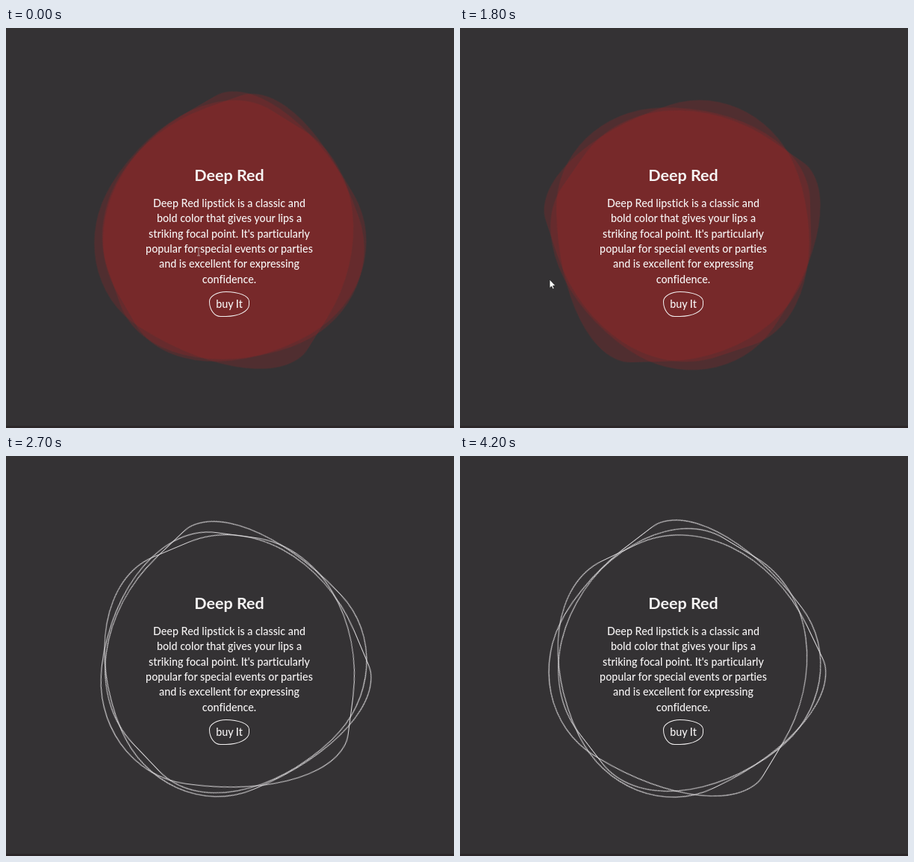
An HTML page for the animation above (4300 ms loop, 600x536 px).

```html
<!DOCTYPE html>
<html lang="en">
<head>
<meta charset="utf-8">
<title>Deep Red</title>
<style>
  html, body { margin: 0; width: 100%; height: 100%; overflow: hidden; }
  body { position: relative; background: #343234; }
  .blob {
    position: absolute;
    box-sizing: border-box;
    border: 1px solid #f4f2f2;
    border-radius: 42% 58% 58% 28% / 39% 38% 47% 59%;
  }
  .ring { left: 130px; top: 106px; width: 340px; height: 340px; }
  .button { left: 272px; top: 352.5px; width: 54px; height: 34.5px; }
  .edge { position: absolute; left: 0; top: 533px; width: 600px; height: 3px; background: #2c2729; }
  svg { position: absolute; left: 0; top: 0; }
  text {
    font: 500 14.3px Lato, sans-serif;
    font-variant-ligatures: none;
    fill: #f7f5f5;
    text-anchor: middle;
  }
  .title { font-size: 21.5px; font-weight: 700; }
</style>
</head>
<body>
<div class="edge"></div>
<div class="blob ring"></div>
<div class="blob ring"></div>
<div class="blob ring"></div>
<div class="blob button"></div>
<svg width="600" height="536">
  <g id="copy">
    <text class="title" x="299" y="205">Deep Red</text>
    <text x="299" y="375">buy It</text>
  </g>
  <g id="cursor">
    <path id="beam" d="M-2 -5.5H2M0 -5.5V5M-2 5H2" fill="none" stroke="#b59a9a"/>
    <path id="arrow" d="M0 0V11.5L2.6 9.2L4.4 13L6.2 12.2L4.5 8.5H8Z" fill="#fff" stroke="#222" stroke-width=".8"/>
  </g>
</svg>
<script>
const LOOP = 4300, STEP = 100, LEAVE = 1800, FADE = 500;
const $ = id => document.getElementById(id);

const lines = [
  "Deep Red lipstick is a classic and",
  "bold color that gives your lips a",
  "striking focal point. It's particularly",
  "popular for special events or parties",
  "and is excellent for expressing",
  "confidence."
];
lines.forEach((line, i) => {
  const el = document.createElementNS("http://www.w3.org/2000/svg", "text");
  el.setAttribute("x", 299);
  el.setAttribute("y", 240 + i * 20.3);
  el.textContent = line;
  $("copy").append(el);
});

const tracks = [];
const play = (el, frames) => {
  const track = el.animate(frames, { duration: LOOP, fill: "both" });
  track.pause();
  tracks.push(track);
};
const at = ms => ms / LOOP;

// start angle and degrees per second
const spins = [[-58, 72], [160.5, -90], [150, 36]];
const filled = "rgba(178,34,34,.22)", empty = "rgba(178,34,34,0)";

document.querySelectorAll(".ring").forEach((ring, i) => {
  const [start, speed] = spins[i];
  play(ring, { transform: [start, start + speed * LOOP / 1000].map(a => `rotate(${a}deg)`) });
  play(ring, [
    { backgroundColor: filled, offset: 0 },
    { backgroundColor: filled, offset: at(LEAVE), easing: "ease" },
    { backgroundColor: empty, offset: at(LEAVE + FADE) },
    { backgroundColor: empty, offset: 1 }
  ]);
  play(ring, [
    { borderColor: "transparent", offset: 0, easing: "step-end" },
    { borderColor: "#dedcde", offset: at(LEAVE + 50), easing: "step-end" },
    { borderColor: "#dedcde", offset: 1 }
  ]);
});

play($("cursor"), [
  { transform: "translate(258px,300px)", offset: 0 },
  { transform: "translate(258px,300px)", offset: at(1300), easing: "ease-in-out" },
  { transform: "translate(120px,337px)", offset: at(LEAVE) },
  { transform: "translate(120px,337px)", offset: 1 }
]);
const show = (el, from, to) => play(el, [
  { opacity: from ? 0 : 1, offset: 0, easing: "step-end" },
  { opacity: 1, offset: at(from), easing: "step-end" },
  { opacity: 0, offset: at(to), easing: "step-end" },
  { opacity: 0, offset: 1 }
]);
show($("beam"), 0, 1550);
show($("arrow"), 1550, LEAVE + 50);

const begin = performance.now();
function draw() {
  const t = Math.max(0, performance.now() - begin) % LOOP;
  const held = Math.floor(t / STEP) * STEP;
  tracks.forEach(track => track.currentTime = held);
  requestAnimationFrame(draw);
}
draw();
</script>
</body>
</html>
```
